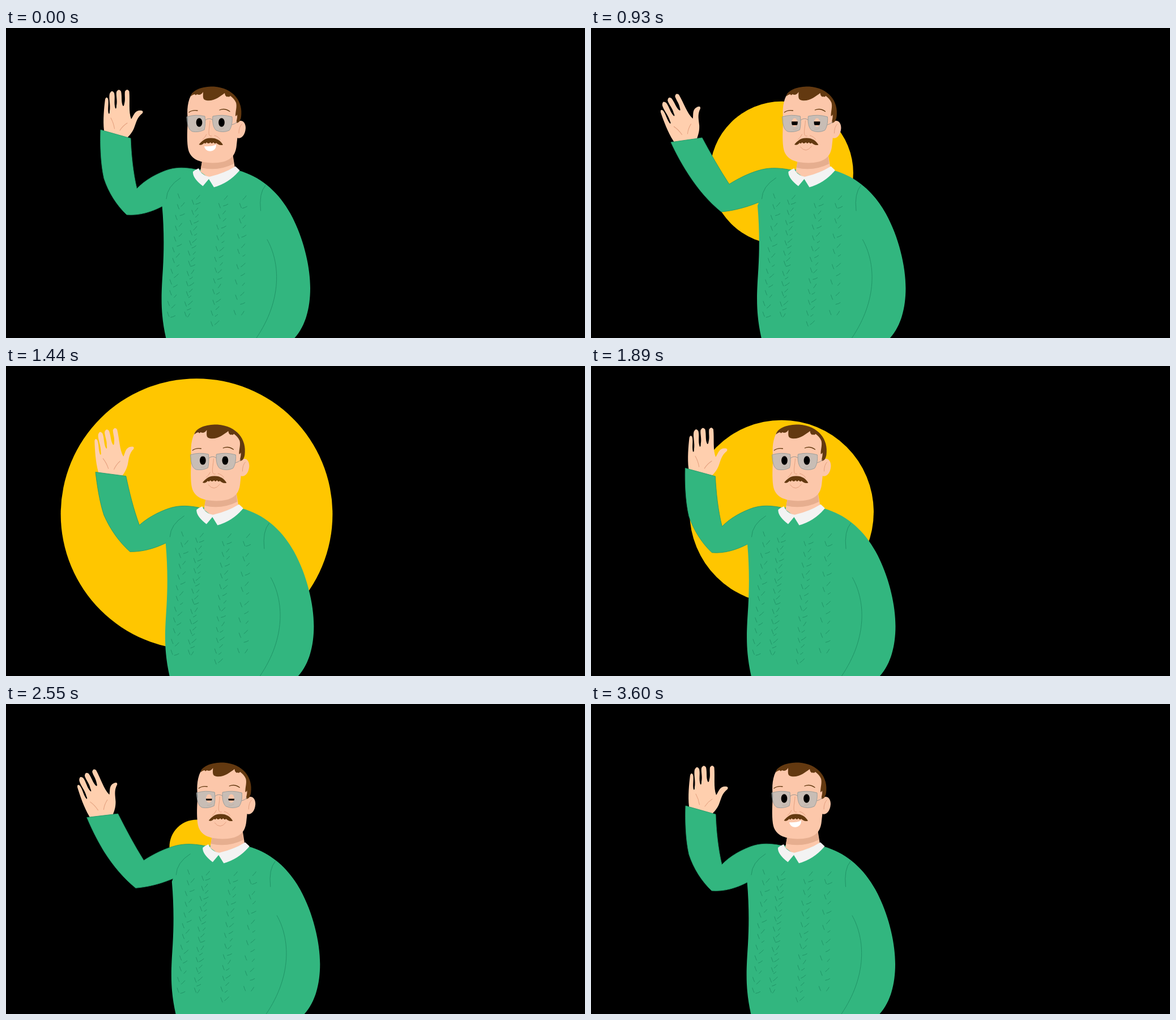
An HTML page for the animation above (3.63 s loop, 1022 px wide and 548 px high).

```html
<!DOCTYPE html>
<html lang="en">
<head>
<meta charset="utf-8">
<title>Waving man</title>
<style>
  html, body { margin: 0; width: 100%; height: 100%; overflow: hidden; background: #000; }
  svg { display: block; width: 100%; height: 100%; }
  .line { fill: none; stroke-linecap: round; stroke-linejoin: round; }
  .knit { stroke: #219467; stroke-width: 1; }
  .crease { stroke: #e39f7e; stroke-width: 1; }
  .brow { stroke: #633910; stroke-width: 1.3; }
  .wire { stroke: #9a9894; stroke-width: 1; }
  .skin { fill: #fcc7aa; }
  .hair { fill: #633910; }
  .lens { fill: rgba(167, 184, 189, .6); stroke: #969a98; stroke-width: .9; }
</style>
</head>
<body>
<svg viewBox="0 0 1022 548" preserveAspectRatio="xMidYMid meet">
  <defs>
    <clipPath id="slit"><rect id="slitBox" x="320" width="80"/></clipPath>
  </defs>
  <circle id="sun" cx="336.5" fill="#ffc600"/>

  <g id="hand">
    <path fill="#ffcfae" d="M174 196 L173 181 C171 163 173 142 175 126 Q177 120 180 125
      C182 133 179 142 181 151 Q183 153 183 147 C185 137 181 124 183 116 Q187 108 191 115
      C193 124 190 133 193 142 Q195 144 195 137 C197 129 194 120 195 113 Q199 106 203 112
      C205 121 203 130 206 137 Q208 140 209 133 C211 126 209 119 210 112 Q214 106 217.500 112
      C219 129 216 148 221 161 C225 156 226 148 234 146 Q244 145 241 150.500
      C231 158 230 167 226 177 C222 186 218 190 213 195 L210 200 Z"/>
    <path class="line crease" d="M185 159 Q190 168 191.500 178 M201 181 Q206 173 214 168"/>
  </g>
  <path id="arm" fill="#32b67f" stroke="#239a6a" stroke-width=".9"/>

  <g id="man">
    <path fill="#32b67f" d="M275.500 314 C279 354 279 390 277 425 C274 472 272 502 282.500 549 H508.500
      C529 527 537 494 537 460 C537 421 525 370 502 328 C481 290 450 263 411 252 L336 250
      C315 252 292 268 283 294 Z"/>
    <path class="line knit" d="M308 265 Q284 280 283 302 M458 278 Q446 292 449.500 323
      M461 374 C484 415 488 480 442 548"/>
    <path id="stitches" class="line knit"/>

    <path class="skin" d="M347 230 L343 254 L359 266 L404 247 L400 222 Z"/>
    <path fill="#e6ae8f" d="M347 232 L344 247 Q374 254 402 240 L400 224 Z"/>
    <path fill="#f3f3f3" d="M330 254 Q335 250 340 248 Q344 260 359 263 Q385 257 405 244.500
      L412.500 251.500 Q394 274 367 281.500 L358 267 L347.500 279.500 Q329 265 330 254 Z"/>

    <path class="skin" d="M407 170 C411 160 423 163 423 177 C422 190 415 197 407 194 Z"/>
    <path class="skin" d="M329 115 C320 128 319 146 321 163 C320 177 319 196 321 211
      C324 232 341 238 365 238.500 C393 238 405 229 407 207 C409 193 409 178 409 164
      L408 127 L390 110 L347 108 Z"/>
    <path class="hair" d="M326 121 C329 108 350 103 367 103.500 C401 106 419 130 415 157
      C414 163 412 167 407 168 C406 164 409 159 408 153 Q406 157 405 155
      C405 147 408 139 406 132 C404 127 400 123 396 120 Q394 123 391 121 Q390 123 387 119
      L386 115 C378 121 367 130 354 128 C346 127 348 120 348 113 C345 118 341 119 337 117
      Q335 120 333 117 Q329 118 326 121 Z"/>
    <path class="line brow" d="M323 149 Q329 144.500 338 146 M377 145 Q386 141 395 147.500"/>
    <path class="line crease" d="M360 164 C360 173 355 190 361 191 L363 191 M354 188 Q351 194 347 197
      M368 190 Q375 192 378 197 M338 179 Q343 180 346 177 M376 179 Q381 180 385 177
      M411 186 Q411 175 416 170"/>

    <path class="line wire" d="M351.500 163 Q358 157.500 365 162.500 M399 171 Q404 170 408 166"/>
    <path class="lens" d="M319 157 Q335 152 351 156 C352 165 352 172 350 180 Q340 185 329 183
      C321 180 320 168 319 157 Z"/>
    <path class="lens" d="M365 156 Q382 152 399 157 C400 166 398 176 394 181 Q383 186 371 181
      C365 176 364 164 365 156 Z"/>
    <g class="skin">
      <ellipse cx="341" cy="167" rx="5.200" ry="7.500"/>
      <ellipse cx="380.500" cy="167" rx="5.200" ry="7.500"/>
    </g>
    <g clip-path="url(#slit)">
      <ellipse cx="341" cy="167" rx="5.400" ry="7.700"/>
      <ellipse cx="380.500" cy="167" rx="5.400" ry="7.700"/>
    </g>

    <path class="line crease" d="M351 210 Q361 222.500 371 209"/>
    <path id="grin" fill="#fff" d="M350 209 Q362 210 371 206 C372 220 352 222 350 209 Z"/>
    <path class="hair" d="M340.500 206 C345 201 350 194.500 361 194.500 C371 194 379 199 383 206.500
      C378 208 374 206 371 203 Q369 206 366 202 Q363 206 361 202 Q357 206 354 202
      Q352 206 350 203 C347 206 344 208 340.500 206 Z"/>
  </g>
</svg>
<script>
const LOOP = 3630, END = 3600, SWING = 1800, SWAY = 18.5, SUN_PEAK = 1500, SUN_R = 255;
const $ = id => document.getElementById(id);
const clamp = v => Math.min(1, Math.max(0, v));
const mix = (a, b, k) => a + (b - a) * k;

// Arm outline at both ends of the wave; both share one structure.
const armIn = 'M167 180 C166 205 167 240 173 266 C181 291 196 314 213 330 C235 332 257 325 276 315 ' +
  'L300 300 L335 250 C310 245 293 247 277 254 C260 261 243 271 231 284 C224 255 221 222 220 195 Z';
const armOut = 'M141 202 C151 224 162 243 173 260 C190 286 208 307 230 325 C252 323 274 317 294 309 ' +
  'L318 300 L353 251 C328 246 311 247 295 252 C278 257 260 266 244 276 C227 250 211 222 196 194 Z';
const outNums = armOut.match(/\d+/g).map(Number);

function armPath(k) {
  let i = 0;
  return armIn.replace(/\d+/g, n => mix(+n, outNums[i++], k).toFixed(2));
}

// Knit columns: top x, bottom x, top y, bottom y, step, slant of each dash.
const columns = [
  [305, 286, 297, 508, 19, -1], [312, 294, 312, 517, 18, 1],
  [330, 316, 308, 516, 18, -1], [339, 322, 299, 517, 11, 1],
  [377, 363, 314, 525, 19, -1], [388, 371, 300, 524, 13, 1],
  [414, 403, 314, 528, 27, -1], [421, 417, 300, 515, 17, 1]
];

function knit() {
  let d = '';
  for (const [x0, x1, y0, y1, step, slant] of columns) {
    for (let y = y0, i = 0; y <= y1; y += step, i++) {
      const x = mix(x0, x1, (y - y0) / (y1 - y0)) + Math.sin(i * 2.3);
      const w = slant < 0 ? 1.5 : 3 + Math.sin(i * 1.9);
      const h = slant < 0 ? 4 : 2.4 + Math.cos(i * 2.6);
      d += `M${x - w} ${y + slant * h} Q${x} ${y + 1} ${x + w} ${y - slant * h}`;
    }
  }
  return d;
}

function draw(time) {
  const t = Math.min(time % LOOP, END);
  const k = (1 - Math.cos(2 * Math.PI * t / SWING)) / 2;

  $('man').setAttribute('transform', `translate(${SWAY * k} 0)`);
  $('arm').setAttribute('d', armPath(k));
  $('hand').setAttribute('transform',
    `translate(${mix(195, 168, k)} ${mix(188, 196, k)}) rotate(${-26 * k}) translate(-195 -188)`);

  const u = clamp(1 - Math.abs(t - SUN_PEAK) / SUN_PEAK);
  const r = SUN_R * (0.47 * u + 0.53 * u * u);
  $('sun').setAttribute('r', r);
  $('sun').setAttribute('cy', 250 + 0.05 * r);

  const blink = clamp(1.23 - Math.abs(t % SWING - 823) / 170);
  const shut = Math.max(blink, 0.15 * k);
  const top = 159 + 10.5 * shut, bottom = 175 - 5.5 * shut;
  $('slitBox').setAttribute('y', top);
  $('slitBox').setAttribute('height', Math.max(0, bottom - top));

  $('grin').setAttribute('opacity', clamp((600 - t) / 150) + clamp((t - 2800) / 150));
}

$('stitches').setAttribute('d', knit());
const start = performance.now();
function tick() {
  draw(performance.now() - start);
  requestAnimationFrame(tick);
}
tick();
</script>
</body>
</html>
```
